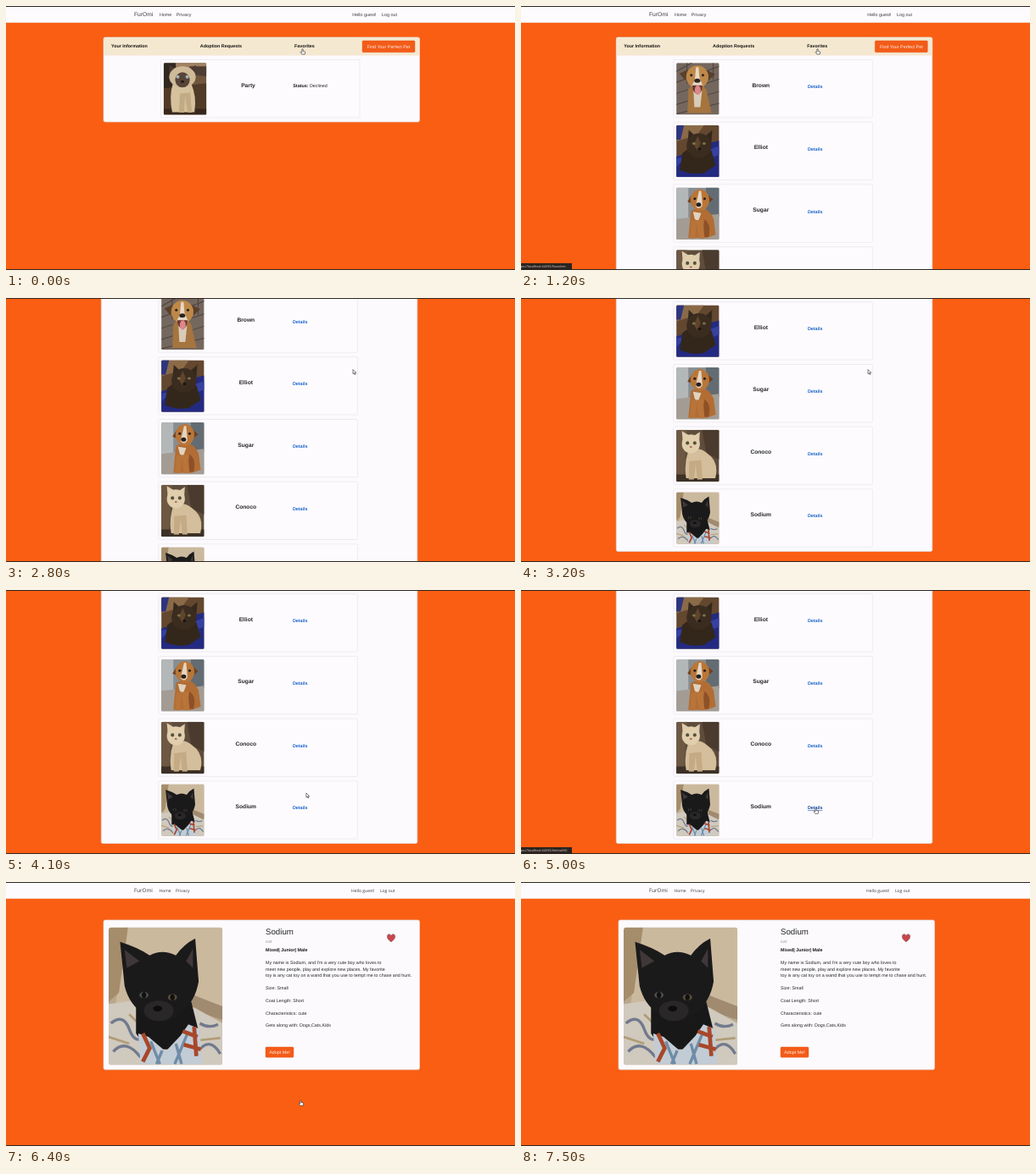
An HTML page that plays this animation: 600x312 px, repeating every 8400 ms.

```html
<!DOCTYPE html>
<html lang="en">
<head>
<meta charset="utf-8">
<title>Pet adoption</title>
<style>
html, body { margin: 0; width: 100%; height: 100%; overflow: hidden; background: #fa5e12; }
svg { display: block; width: 600px; height: 312px; }
text { font: 5.36px "Liberation Sans", Arial, sans-serif; fill: #26262a; text-rendering: geometricPrecision; white-space: pre; }
.b { font-weight: 700; fill: #151515; }
.name { font-size: 6.67px; font-weight: 700; text-anchor: middle; }
.brand { font-size: 6.67px; }
.link { font-weight: 700; fill: #1762c9; }
.link.over { fill: #0c4796; text-decoration: underline; }
.btn { fill: #fff0e6; text-anchor: middle; }
.nav text { fill: #3c3c40; }
.open text { font-family: "Open Sans", "Noto Sans", sans-serif; font-size: 5px; }
.open .brand { font-size: 6.25px; }
.tip { font: 3.75px "Open Sans", "Noto Sans", sans-serif; fill: #ddd6d2; }
.hidden { display: none; }
</style>
</head>
<body>
<svg id="stage" viewBox="0 0 600 312"></svg>
<script>
const LOOP = 8400, PITCH = 73.7, SCROLL = 132.5;

// Markup helpers
const path = (fill, d) => `<path fill="${fill}" d="${d}"/>`;
const oval = (fill, x, y, rx, ry = rx) => `<ellipse fill="${fill}" cx="${x}" cy="${y}" rx="${rx}" ry="${ry}"/>`;
const rect = (fill, x, y, w, h, r = 0, more = '') =>
  `<rect fill="${fill}" x="${x}" y="${y}" width="${w}" height="${h}" rx="${r}" ${more}/>`;
const text = (x, y, s, cls = '', more = '') => `<text x="${x}" y="${y}" class="${cls}" ${more}>${s}</text>`;
const group = (id, s, more = '') => `<g id="${id}" ${more}>${s}</g>`;
const lines = (stroke, width, d) => `<path fill="none" stroke="${stroke}" stroke-width="${width}" d="${d}"/>`;

// Simplified pet pictures, each 100 by 122
const pets = {
  Party:
    rect('#70563d', 0, 0, 100, 122) + rect('#302720', 0, 0, 28, 62) + path('#a08262', 'M28 0H100V24L30 18Z') +
    path('#4d3d35', 'M60 8H100V32L62 27Z') + path('#513a28', 'M0 60L100 48V122H0Z') + rect('#38281d', 0, 108, 100, 14) +
    path('#d5c19d', 'M22 48Q42 34 64 48Q78 80 72 116H20Q12 78 22 48Z') + path('#c2aa84', 'M38 72L36 117H48L50 78L56 117H66L62 70Z') +
    path('#4c3b31', 'M14 32L13 5L34 18ZM74 32L75 5L56 17Z') + oval('#cfba98', 44, 33, 31, 25) +
    oval('#594538', 44, 40, 17, 18) + oval('#a3b5ba', 33, 33, 4) + oval('#a3b5ba', 55, 33, 4) + oval('#221b18', 44, 44, 4, 3),
  Brown:
    rect('#74675e', 0, 0, 100, 122) + lines('#4c433d', 2, 'M0 20L36 0M0 46L100 8M0 72L100 38M0 98L100 67M0 120L100 95M25 0V50M86 0V40') +
    path('#a5743f', 'M28 62Q48 40 70 62L82 118H26Z') + path('#d8cbb8', 'M40 66H60L56 104H42Z') +
    path('#59402c', 'M27 16L7 25L22 42ZM69 16L91 27L75 42Z') + oval('#bd8849', 49, 33, 26, 27) +
    path('#e6d8c5', 'M46 10H52L54 35L62 54Q48 68 36 54L43 41Z') + oval('#2b2522', 49, 42, 7, 5) +
    oval('#251e19', 35, 29, 3) + oval('#251e19', 62, 29, 3) + path('#6b3530', 'M37 53H61Q60 72 50 73Q38 71 37 53Z') + oval('#dc8789', 50, 64, 7, 11),
  Elliot:
    rect('#63472f', 0, 0, 100, 122) + path('#8a6a47', 'M0 0H65L48 23L0 38Z') + path('#2d357f', 'M0 0H18L10 34H0Z') +
    path('#232a82', 'M0 74L28 64L69 44L100 36V122H0Z') +
    path('#3641a0', 'M0 78L22 76L0 98ZM76 58L100 49V70L82 76Z') + path('#33271c', 'M14 66Q45 36 82 60L92 94L65 112Q35 118 8 105Z') +
    path('#34281e', 'M26 49L29 11L46 27L67 26L84 11L81 52Z') + oval('#3b2c20', 53, 48, 29, 29) +
    path('#60442c', 'M50 25L57 42L49 60L41 46Z') + oval('#7d7048', 41, 43, 4, 3) + oval('#7d7048', 65, 43, 4, 3) + oval('#171411', 54, 56, 4, 3),
  Sugar:
    rect('#878e93', 0, 0, 100, 122) + rect('#b3b7b8', 0, 0, 28, 78) + rect('#636c73', 69, 0, 31, 68) +
    path('#a39c94', 'M0 74L100 62V122H0Z') + path('#b16d34', 'M34 55Q71 36 87 73L92 111L72 118H28Z') +
    path('#8e5026', 'M66 75Q83 88 75 116L59 116Z') + path('#e0d2c0', 'M39 57L58 60L51 80L43 74Z') +
    path('#b87439', 'M35 78L32 119H44L47 82L53 119H66L62 75Z') + path('#70401f', 'M36 17L26 33L41 39ZM71 14L86 28L74 37Z') +
    oval('#b97639', 55, 29, 22, 25) + path('#e5d5c2', 'M53 8H58L61 42Q54 54 45 44Z') + oval('#29211d', 52, 40, 6, 5) +
    oval('#241c17', 43, 26, 3) + oval('#241c17', 66, 26, 3),
  Conoco:
    rect('#5e4c3c', 0, 0, 100, 122) + path('#4a3b2e', 'M60 0H100V70L70 55Z') + path('#6d5843', 'M0 0H25L17 122H0Z') +
    rect('#3d3127', 0, 105, 100, 17) + path('#d4be9b', 'M28 49Q53 38 72 55Q101 75 91 114H23Q17 82 28 49Z') +
    path('#c4aa85', 'M30 74L29 117H41L45 79L49 117H61L58 71Z') + path('#dfcbad', 'M15 28L13 3L31 14L40 15L55 5L53 34Z') +
    oval('#e0cead', 34, 33, 21, 22) + oval('#54503b', 26, 31, 4) + oval('#54503b', 43, 31, 4) + oval('#a7635a', 34, 40, 3, 2),
  Sodium:
    rect('#b9a78d', 0, 0, 100, 122) + path('#cbb99e', 'M15 0H100V77L65 63L6 70Z') + path('#a58d6b', 'M0 0H17L9 58L0 66Z') +
    path('#a08b70', 'M72 59L100 70V82L70 72Z') + path('#d0c9bd', 'M0 68L28 64L75 71L100 85V122H0Z') +
    lines('#717a8e', 2.5, 'M2 85Q13 76 18 90T31 97M4 110Q15 98 28 115M80 85Q88 90 96 86M77 112Q88 95 98 112') +
    lines('#b09c76', 2, 'M0 97L18 103M18 77L27 86M79 100L98 98') +
    path('#191819', 'M24 58Q46 44 70 56L79 92L66 108H34L24 94Z') +
    path('#1b1a1b', 'M14 52L10 13Q26 18 36 25Q47 19 59 25Q66 15 76 10L79 48Q76 66 63 76Q47 92 30 76Q18 68 14 52Z') +
    path('#403738', 'M16 36L14 20L27 30ZM68 30L74 19L74 36Z') +
    oval('#292728', 44, 74, 13, 9) + oval('#4c5048', 31, 60, 4, 2.8) + oval('#5b4c38', 56, 62, 4, 2.8) +
    oval('#111', 31, 60, 2, 2.7) + oval('#111', 56, 62, 2, 2.7) + oval('#0d0d0e', 43, 72, 4, 2.5) +
    path('#c2ccd5', 'M26 94L35 97L50 110L63 96L70 86L80 90L82 121H28Z') +
    lines('#6f8ca7', 2.5, 'M37 101L45 121M47 109L42 121M59 103L64 121M70 92L58 121') +
    lines('#a84729', 3.5, 'M30 94L36 107L30 119M65 92L78 97M66 104L81 108M75 88L77 114')
};
const photo = (name, x, y, w, h) =>
  `<svg x="${x}" y="${y}" width="${w}" height="${h}" viewBox="0 0 100 122" preserveAspectRatio="none">
   <g clip-path="url(#round)">${pets[name]}</g></svg>`;

// Page parts
const panel = (x, y, w, h) => rect('#fcfafd', x, y, w, h, 2, 'stroke="#e0d8db" stroke-width=".7"');
const button = (x, y, w, h, s) => rect('#f35b18', x, y, w, h, 1.3, 'stroke="#e2561a" stroke-width=".4"') + text(x + w / 2, y + h / 2 + 1.8, s, 'btn');
const nav = (cls, home, privacy, hello, logout) =>
  `<g class="nav ${cls}">` + rect('#fdfbfe', 0, 0, 600, 19.6) + rect('#e9dfe2', 0, 19.3, 600, .5) +
  text(151, 12.2, 'FurOmi', 'brand') + text(home, 11.8, 'Home') + text(privacy, 11.8, 'Privacy') +
  text(hello, 11.8, 'Hello guest!') + text(logout, 11.8, 'Log out') + '</g>';
const tabs = h => panel(115, 37, 372.5, h) + rect('#f5e8d0', 115.3, 37.3, 371.9, 21.2, 1.5) +
  text(124, 49.4, 'Your Information', 'b') + text(228.8, 49.4, 'Adoption Requests', 'b') +
  text(340, 49.4, 'Favorites', 'b') + button(420, 41, 62, 13.7, 'Find Your Perfect Pet');
const card = (name, y, extra) =>
  `<g transform="translate(0 ${y})">` + rect('#fdfbfe', 182.5, 63.5, 234.5, 68.3, 1, 'stroke="#e6e2e7" stroke-width=".6"') +
  photo(name, 185.8, 67.2, 50.5, 61.3) + text(285.5, 95.6, name, 'name') + extra + '</g>';

const requests = nav('', 181, 200.8, 408.3, 443) + tabs(100) +
  card('Party', 0, text(338.3, 95.5, '<tspan class="b">Status:</tspan> Declined'));

const favorites = nav('', 181, 200.8, 408.3, 443) + '<g transform="translate(-2.7 0)">' + tabs(395) +
  ['Brown', 'Elliot', 'Sugar', 'Conoco', 'Sodium'].map((name, i) =>
    card(name, i * PITCH, text(340.6, 97.2, 'Details', 'link', `id="link${i}"`))).join('') + '</g>';

const about = [
  [97, 'My name is Sodium, and I\'m a very cute boy who loves to'],
  [104.6, 'meet new people, play and explore new places. My favorite'],
  [112.2, 'toy is any cat toy on a wand that you use to tempt me to chase and hunt.'],
  [127.4, 'Size: Small'], [142.1, 'Coat Length: Short'],
  [156.8, 'Characteristics: cute'], [171.4, 'Gets along with: Dogs,Cats,Kids']
];
const details = nav('open', 180.5, 200, 407, 441) + panel(115, 45, 372.5, 176.8) + photo('Sodium', 121, 53.4, 134.3, 163) +
  text(306, 62.3, 'Sodium', '', 'style="font-size:9.7px"') + text(306, 71.6, 'CAT', '', 'style="font-size:4px;fill:#77777c"') +
  text(306, 82, 'Mixed| Junior| Male', 'b') + about.map(([y, s]) => text(306, y, s)).join('') +
  button(306, 195, 33, 12.3, 'Adopt Me!') +
  `<path d="M454 70.8C451 68.7 449.2 66.6 449.3 64.2C449.4 61.3 452.9 60.9 454 63.4C455.1 60.9 458.6 61.3 458.7 64.2C458.8 66.6 457 68.7 454 70.8Z"
   fill="#c9464c" stroke="#85605f" stroke-width=".6"/>`;

const cursor = group('arrow', '<path d="M0 0V5.2L1.3 4.1L2.1 6L3 5.6L2.2 3.8H3.8Z"/>') +
  group('hand', '<path d="M-.6 .3Q0 -.4 .6 .3V2.5L2.5 2.9Q3.3 3.1 3.2 4L2.7 6.3H-.7L-2.4 3.9Q-2.2 3 -1.3 3.5L-.6 4Z"/>');

const stage = document.getElementById('stage');
stage.innerHTML = '<clipPath id="round"><rect width="100" height="122" rx="3"/></clipPath>' +
  rect('#fa5e12', 0, 0, 600, 312) +
  group('requests', requests) + group('favorites', favorites) + group('details', details) +
  rect('#302724', 0, 0, 600, 1) + rect('#302724', 0, 311, 600, 1) +
  group('status', rect('#2b2420', 0, 304, 60, 8) + text(0, 309.4, '', 'tip', 'id="address"')) +
  group('cursor', cursor, 'fill="#fff" stroke="#26262a" stroke-width=".6" stroke-linejoin="round"');

const $ = id => document.getElementById(id);
const show = (id, on) => $(id).classList.toggle('hidden', !on);
const ease = (t, from, to) => {
  const k = Math.min(1, Math.max(0, (t - from) / (to - from)));
  return k * k * (3 - 2 * k);
};

function draw(now) {
  const t = Math.floor(now / 100) * 100 % LOOP;
  const page = t < 1100 ? 'requests' : t < 5100 ? 'favorites' : 'details';
  for (const id of ['requests', 'favorites', 'details']) show(id, id === page);
  $('favorites').setAttribute('transform', `translate(0 ${-SCROLL * ease(t, 2395, 3195)})`);

  const out = ease(t, 1200, 2000), down = ease(t, 3300, 4300);
  const x = 349.5 + 59.5 * out - 61.5 * down;
  const y = 50.7 + 33.8 * out + 173.5 * down;
  const hand = t < 1400 || t >= 4300;
  $('cursor').setAttribute('transform', `translate(${x} ${y})`);
  show('cursor', t < 7000);
  show('hand', hand);
  show('arrow', !hand);

  $('link4').classList.toggle('over', t >= 4300);
  show('status', t >= 100 && t < 1400 || t >= 4500 && t < 5400);
  $('address').textContent = 'ps://localhost:44335/' + (t < 1400 ? 'Favorites' : 'Animal/60');
}

function tick() {
  draw(performance.now());
  requestAnimationFrame(tick);
}
tick();
</script>
</body>
</html>
```
